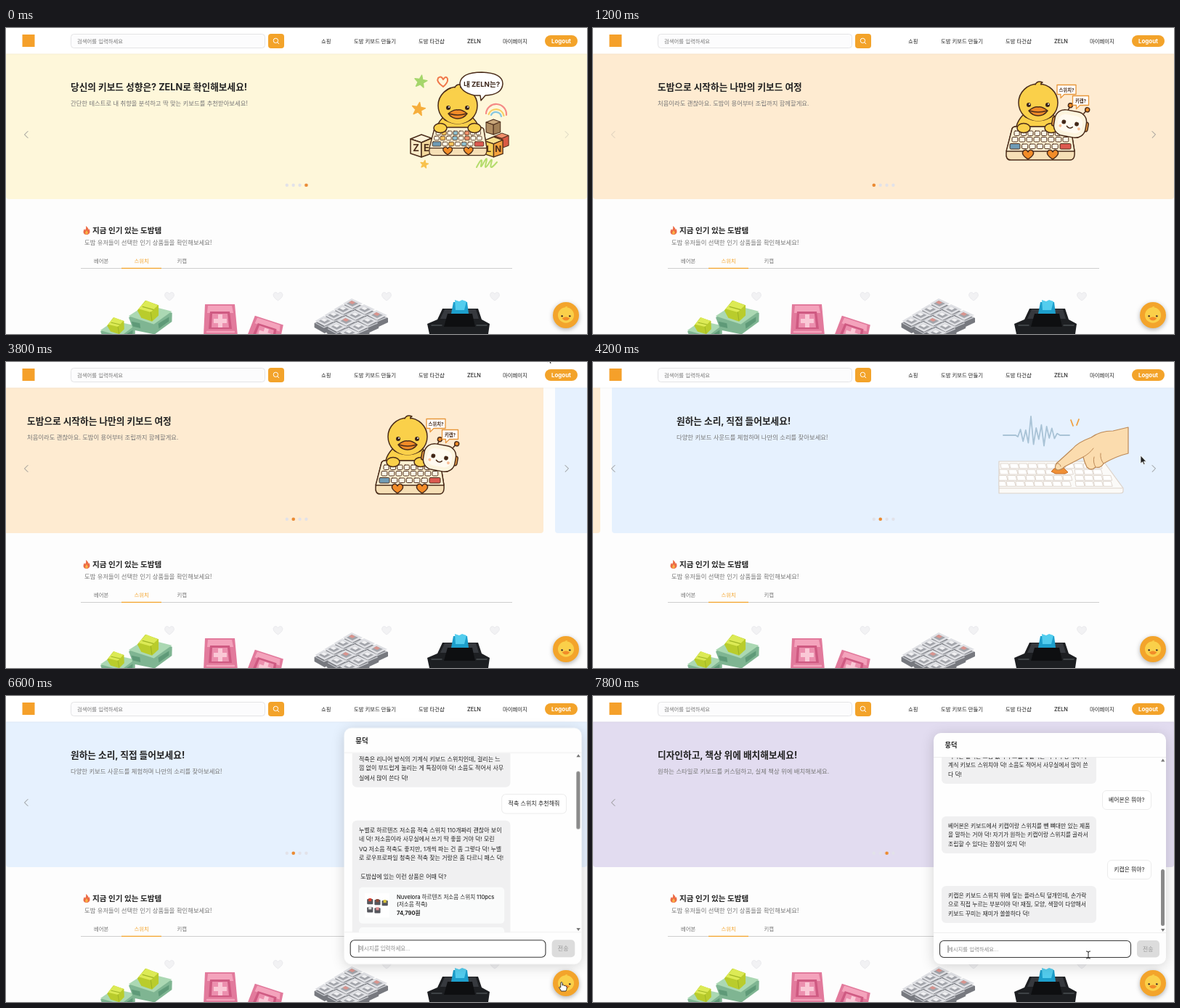
An HTML page for the animation above (8000 ms loop, 800 by 422 pixels).

```html
<!DOCTYPE html>
<html lang="ko">
<head>
<meta charset="utf-8">
<title>키보드 상점</title>
<style>
html, body { margin: 0; width: 100%; height: 100%; overflow: hidden; background: #fdfdfd; }
body { position: relative; font-family: Inter, "Noto Sans CJK KR", "Noto Sans CJK", sans-serif; color: #222; }
svg { position: absolute; left: 0; top: 0; display: block; overflow: hidden; fill: #222; }
.loop { animation: 8s step-end -10ms infinite; }
.title { font-size: 12.7px; font-weight: 700; }
.sub { font-size: 8.36px; fill: #777; }
.small { font-size: 7.37px; }
.medium { font-weight: 500; }
.bold { font-weight: 700; }
.gray { fill: #777; }
.ink { stroke: #4a2c1a; stroke-width: 1.5; stroke-linejoin: round; stroke-linecap: round; }
.line { fill: none; stroke-linecap: round; stroke-linejoin: round; }
.header { filter: drop-shadow(0 .5px 1px rgba(0,0,0,.08)); }

#track { animation-name: track; }
@keyframes track {
  0% { transform: translateX(-2448px); }
  5% { transform: translateX(-1720px); }
  7.5% { transform: translateX(-634px); }
  10% { transform: translateX(-40px); }
  12.5% { transform: none; }
  47.5% { transform: translateX(-60px); }
  50% { transform: translateX(-470px); }
  52.5% { transform: translateX(-790px); }
  55% { transform: translateX(-816px); }
  92.5% { transform: translateX(-1060px); }
  95% { transform: translateX(-1550px); }
  97.5%, 100% { transform: translateX(-1632px); }
}
#dot { animation-name: dot; }
@keyframes dot {
  0% { transform: translateX(26.6px); }
  5% { transform: none; }
  47.5% { transform: translateX(8.9px); }
  92.5%, 100% { transform: translateX(17.7px); }
}
#prev { animation-name: prev; }
@keyframes prev { 0%, 47.5%, 100% { opacity: 1; } 5% { opacity: .35; } }
#next { animation-name: next; }
@keyframes next { 0% { opacity: .35; } 5%, 100% { opacity: 1; } }

#chat {
  position: absolute; left: 469px; top: 51px; width: 320px; height: 319px; overflow: hidden;
  background: #fefefe; border-radius: 10px; box-shadow: 0 3px 18px rgba(0,0,0,.17);
  transform-origin: 50% 100%; animation-name: open;
}
@keyframes open {
  0% { visibility: hidden; }
  82.5% { visibility: visible; transform: scale(1.022); }
  85%, 100% { visibility: visible; transform: none; }
}
#view { position: absolute; top: 33px; width: 320px; height: 243px; overflow: hidden; border: solid #eee; border-width: 1px 0; box-sizing: border-box; }
#log { display: flex; flex-direction: column; gap: 9px; padding: 6px 20px 14px 11px; animation-name: scroll; }
@keyframes scroll {
  0%, 82.5% { transform: translateY(-47px); }
  85% { transform: translateY(-340px); }
  87.5%, 100% { transform: translateY(-471px); }
}
.bot, .me { box-sizing: border-box; flex: none; font-size: 7.83px; line-height: 12.6px; padding: 6.6px 9px; border-radius: 6px; white-space: pre; }
.bot { position: relative; width: 213px; height: 51px; background: #f0f0f1; }
.tall { height: 273px; }
.me { align-self: flex-end; height: 27px; padding: 6.2px 8.5px; border: 1px solid #ececec; background: #fff; }
.card { position: absolute; left: 9px; width: 196px; height: 49px; border-radius: 5px; background: #fafbfb; font-size: 7.4px; line-height: 10.9px; font-weight: 500; }
.card p { position: absolute; left: 51px; top: 8.5px; margin: 0; }
.card svg { left: 8px; top: 8px; background: #fff; }
#thumb { position: absolute; left: 313px; top: 44px; width: 5px; height: 78px; border-radius: 3px; background: #8a8a8a; animation-name: thumb; }
@keyframes thumb {
  0%, 82.5% { transform: translateY(14.5px); }
  85% { transform: translateY(104px); }
  87.5%, 100% { transform: translateY(144px); }
}

#tip { animation-name: tip; filter: drop-shadow(0 1px 3px rgba(0,0,0,.16)); }
@keyframes tip { 0%, 82.5%, 100% { visibility: hidden; } 62.5% { visibility: visible; } }
#button { animation-name: bounce; filter: drop-shadow(0 2px 3px rgba(0,0,0,.3)); }
@keyframes bounce {
  0%, 30%, 100% { transform: none; }
  25% { transform: translateY(-4px); }
  27.5% { transform: translateY(-7.5px); }
}

#cursor { animation-name: move; }
@keyframes move {
  0% { transform: translate(747px, -30px); }
  47.5% { transform: translate(745px, -10px); animation-timing-function: steps(6); }
  62.5% { transform: translate(772px, 407px); animation-timing-function: step-end; }
  65% { transform: translate(772px, 409px); }
  70% { transform: translate(769px, 404px); }
  75%, 82.5% { transform: translate(766px, 400px); animation-timing-function: steps(3); }
  90%, 100% { transform: translate(682px, 357px); }
}
#arrow { animation-name: arrow; }
@keyframes arrow { 0%, 62.5%, 100% { visibility: hidden; } 47.5% { visibility: visible; } }
#hand { animation-name: hand; }
@keyframes hand { 0%, 85%, 100% { visibility: hidden; } 62.5% { visibility: visible; } }
#beam { animation-name: beam; }
@keyframes beam { 0% { visibility: hidden; } 85%, 100% { visibility: visible; } }
</style>
</head>
<body>
<svg id="page" width="800" height="422"></svg>

<div id="chat" class="loop">
  <div id="view"><div id="log" class="loop">
    <div class="me">적축은 뭐야?</div>
    <div class="bot">적축은 리니어 방식의 기계식 키보드 스위치인데, 걸리는 느
낌 없이 부드럽게 눌리는 게 특징이야 덕! 소음도 적어서 사무
실에서 많이 쓴다 덕!</div>
    <div class="me">적축 스위치 추천해줘</div>
    <div class="bot tall">누벨로 하르텐즈 저소음 적축 스위치 110개짜리 괜찮아 보이
네 덕! 저소음이라 사무실에서 쓰기 딱 좋을 거야 덕! 모린
VQ 저소음 적축도 좋지만, 1개씩 파는 건 좀 그렇다 덕! 누벨
로 로우프로파일 청축은 적축 찾는 거랑은 좀 다르니 패스 덕!

 도밤샵에 있는 이런 상품은 어때 덕?</div>
    <div class="me">적축이 뭐야?</div>
    <div class="bot">적축은 걸리는 느낌 없이 부드럽게 눌리는 리니어 방식의 기
계식 키보드 스위치야 덕! 소음도 적어서 사무실에서 많이 쓴
다 덕!</div>
    <div class="me">베어본은 뭐야?</div>
    <div class="bot">베어본은 키보드에서 키캡이랑 스위치를 뺀 뼈대만 있는 제품
을 말하는 거야 덕! 자기가 원하는 키캡이랑 스위치를 골라서
조립할 수 있다는 장점이 있지 덕!</div>
    <div class="me">키캡은 뭐야?</div>
    <div class="bot">키캡은 키보드 스위치 위에 덮는 플라스틱 덮개인데, 손가락
으로 직접 누르는 부분이야 덕! 재질, 모양, 색깔이 다양해서
키보드 꾸미는 재미가 쏠쏠하다 덕!</div>
  </div></div>
  <div id="thumb" class="loop"></div>
  <svg width="320" height="319">
    <text class="bold" x="15.5" y="20.3" font-size="9.2">뭉덕</text>
    <path d="M313 39.5l2.7-4 2.7 4zM313 270l2.7 4 2.7-4z" fill="#777"/>
    <rect x="8.5" y="286.5" width="263" height="23" rx="5.5" fill="#fff" stroke="#3a3a3a" stroke-width="1.1"/>
    <path d="M20 293v10" stroke="#333" stroke-width=".7"/>
    <text class="small" x="20" y="300.8" fill="#8a8a8a">메시지를 입력하세요...</text>
    <rect x="280" y="286" width="31" height="23.5" rx="5" fill="#dcdcdc"/>
    <text class="medium" x="288" y="300.8" font-size="7.8" fill="#999">전송</text>
  </svg>
</div>

<svg id="overlay" width="800" height="422"></svg>

<script>
const text = (x, y, cls, str, extra = '') => `<text x="${x}" y="${y}" class="${cls}" ${extra}>${str}</text>`;
const poly = (fill, points, extra = '') => `<polygon points="${points}" fill="${fill}" ${extra}/>`;
const path = (d, fill, extra = '') => `<path d="${d}" fill="${fill}" ${extra}/>`;
const curve = (d, stroke, width = 1.5) => `<path class="line" d="${d}" stroke="${stroke}" stroke-width="${width}"/>`;
const times = (n, fn) => Array.from({ length: n }, (_, i) => fn(i)).join('');
const move = (x, y, body, extra = '') => `<g transform="translate(${x} ${y}) ${extra}">${body}</g>`;

const star = (x, y, r, fill) => {
  const points = times(10, i => {
    const a = i * Math.PI / 5 - 1.4, d = i % 2 ? r * .42 : r;
    return `${x + d * Math.cos(a)},${y + d * Math.sin(a)} `;
  });
  return poly(fill, points, `stroke="${fill}" stroke-width="1.5" stroke-linejoin="round"`);
};

const duckHead = `
  <ellipse rx="27" ry="26" fill="#fad04a"/>
  <path d="M-4 -25Q-1 -31 6 -28Q3 -27 4 -25" fill="#fad04a"/>
  <g stroke="none"><circle cx="-13" cy="3" r="3" fill="#38231a"/><circle cx="13" cy="3" r="3" fill="#38231a"/>
  <circle cx="-12" cy="2" r="1" fill="#fff"/><circle cx="14" cy="2" r="1" fill="#fff"/></g>
  <path d="M-13 11Q-5 5 0 6Q5 5 13 11Q8 18 0 18Q-8 18 -13 11Z" fill="#f28c28"/>
  <path d="M-12 11Q0 15 12 11" fill="none"/>`;
const duck = `<path d="M-20 16Q-36 32 -28 50H28Q36 32 20 16Z" fill="#fad04a"/>${duckHead}
  <path d="M-17 21Q0 30 17 21L18 30H-18Z" fill="#fad04a" stroke="none"/>`;
const wings = (left, right, y) => [left, right].map(x => `<ellipse cx="${x}" cy="${y}" rx="9" ry="6.5" fill="#fad04a"/>`).join('');

const keyRow = (x, y, n, pitch, fills) => times(n, i =>
  `<rect x="${x + i * pitch}" y="${y}" width="${pitch - 2.2}" height="6.5" rx="1.4" fill="${fills[i % fills.length]}"/>`);
const keyboard = fills => `
  ${path('M577 139Q578 136 582 136H653Q657 136 658 139L663 170Q664 182 657 182H575Q568 182 569 172Z', '#f6dfb6')}
  ${path('M577 139Q578 136 582 136H653Q657 136 658 139L663 170H569Z', '#fdf0d2')}
  <g stroke-width="1">${keyRow(580, 142, 8, 9.4, fills)}${keyRow(577, 150.5, 8, 10, fills)}
  <rect x="574" y="159.5" width="14" height="7.5" rx="1.4" fill="#6f9bb5"/>
  ${keyRow(590.5, 160, 5, 10.4, fills)}
  <rect x="643" y="159.5" width="15" height="7.5" rx="1.4" fill="#dc5a50"/></g>`;
const feet = [599, 633].map(x => path(`M${x} 181Q${x - 11} 174 ${x - 6} 169Q${x - 2} 167 ${x} 171Q${x + 2} 167 ${x + 6} 169Q${x + 11} 174 ${x} 181Z`, '#f28c28')).join('');

const robot = move(657, 132, `
  ${path('M-6 -18L-4 -24M16 -17L19 -22', 'none')}
  <circle cx="-4" cy="-25" r="3" fill="#f28c28"/><circle cx="20" cy="-23" r="3" fill="#f28c28"/>
  <rect x="-25" y="-6" width="6" height="13" rx="3" fill="#f3a44a"/><rect x="19" y="-6" width="6" height="13" rx="3" fill="#f3a44a"/>
  <rect x="-22" y="-18" width="44" height="36" rx="14" fill="#fdf4de"/>
  <rect x="-17" y="-12" width="34" height="24" rx="10" fill="#fffaf0" stroke="none"/>
  <circle cx="-9" cy="-1" r="2.2" fill="#38231a"/><circle cx="9" cy="-1" r="2.2" fill="#38231a"/>
  ${path('M-4 4Q0 8 4 4', 'none')}
  <g stroke="none" fill="#f8bd94"><circle cx="-13" cy="5" r="2"/><circle cx="13" cy="5" r="2"/></g>`, 'rotate(10)');
const balloon = (x, y, w, str) =>
  path(`M${x} ${y}h${w}v13h${-w + 10}l-5 5v-5h-5z`, '#fff', 'stroke="#e8963a" stroke-width="1.3" stroke-linejoin="round"')
  + text(x + w / 2, y + 9, 'bold', str, 'font-size="6.3" text-anchor="middle" fill="#4a2c1a"');

const journeyArt = `<g class="ink">${move(613, 103, duck)}${keyboard(['#fdf7e6'])}
  ${wings(593, 631, 138)}${feet}${robot}</g>${balloon(639, 78.5, 26, '스위치?')}${balloon(660.5, 93.5, 22, '키캡?')}`;

const block = (x, y, scale, top, left, right, a = '', b = '') => move(x, y, `
  ${poly(top, '0,6 15,0 29,5 15,11')}${poly(left, '0,6 15,11 15,31 0,26')}${poly(right, '15,11 29,5 29,26 15,31')}
  <g font-size="13" text-anchor="middle" fill="#4a2c1a" stroke="none">
  ${text(7.5, 23, 'bold', a)}${text(22, 23, 'bold', b)}</g>`, `scale(${scale})`);
const testArt = `
  ${star(571, 74, 9, '#a5d66b')}${star(568, 112, 9.5, '#f6ae3c')}${star(576, 188, 5.5, '#f8c24e')}
  ${curve('M602 81Q592 74 595 69Q599 65 602 71Q606 65 608 70Q609 75 602 81', '#f0784a', 2)}
  ${curve('M661 118A14 14 0 0 1 689 120', '#f58a86', 2.2)}${curve('M664.500 119A11 11 0 0 1 685.500 121', '#f9cf62', 2.2)}${curve('M668 120A7.500 7.500 0 0 1 682 122', '#86c7e0', 2.2)}
  ${curve('M648 192Q656 177 655 185Q652 196 657 187Q664 174 661 186Q658 197 664 188Q671 176 668 187Q665 198 676 185', '#b4dc6c', 2)}
  <g class="ink">${block(661, 126, .68, '#c9a77a', '#b08d62', '#a17f56')}
  ${move(622, 107, duck)}
  ${block(557, 147, 1, '#fdf3da', '#fbeac6', '#f3d79c', 'Z', 'E')}
  ${block(673, 145, .66, '#f28f6a', '#e8694e', '#d95a44')}
  ${block(658, 150, .9, '#fbe08e', '#f8cf58', '#f6a23e', 'L', 'N')}
  <g transform="translate(105 22.8) scale(.84)">${keyboard(['#fdf7e6', '#f9c25c', '#fdf7e6', '#8fbfce', '#fdf7e6', '#f0906a', '#fdf7e6'])}${feet}</g>
  ${wings(598, 645, 138)}
  ${path('M645 93Q625 88 625 76Q627 61 655 61Q684 62 684 77Q683 92 660 93L654 100L653 93Z', '#fff')}</g>
  ${text(655, 80.5, 'bold', '내 ZELN는?', 'font-size="9.600" text-anchor="middle" fill="#3a2418"')}`;

const wave = Array.from({ length: 16 }, (_, i) => {
  const swing = [3, 8, 12, 7, 15, 26, 18, 10][Math.min(i, 15 - i)] * (i < 8 ? 1 : .8);
  return `L${559 + i * 3.6} ${101 + (i % 2 ? -swing : swing * .7)}`;
}).join('');
const soundArt = `
  ${curve(`M539 101H556${wave}L617 101H630`, '#a9c3d6', 1.8)}
  ${curve('M632 80L635 88M643 79L640 87', '#f0a040', 1.8)}
  ${path('M533 137H677L704 174V178Q704 181 700 181H533Z', '#fbfaf8', 'stroke="#ddd3ca" stroke-width="1.2"')}
  ${curve('M533 174H703', '#ddd3ca', 1)}
  <g stroke="#ddd3ca" stroke-width=".9">${times(4, r => times(11 + (r > 1), i => {
    const x = 535 + i * 12.7 - r * 1.5 + (i > 7 ? r * 2 : 0), y = 140 + r * 8.2;
    return poly('#fff', `${Math.max(533, x)},${y} ${x + 11},${y} ${x + 13},${y + 6.8} ${Math.max(533, x + 1)},${y + 6.8}`);
  }))}</g>
  ${path('M609 147L622 146L628 152L624 154H611L605 151Z', '#f08f35', 'stroke="#c8702a" stroke-width="1"')}
  ${path('M711 90L690 95Q672 95 660 104Q641 111 634 120L612 140Q608 148 614 149Q619 149 624 144L649 131Q651 139 654 145Q660 151 666 145Q673 147 677 140Q694 130 711 126Z', '#fbdcae', 'stroke="#bd8a57" stroke-width="1.2" stroke-linejoin="round"')}
  ${curve('M649 131Q658 126 663 119M666 145Q662 138 664 131M677 140Q672 134 673 126M612 140Q617 139 618 144', '#bd8a57', 1)}`;

const deskArt = `
  <rect x="552" y="148" width="156" height="9" rx="3" fill="#c9a27c"/>
  <path d="M566 157v45M694 157v45" stroke="#b08a66" stroke-width="6"/>
  <rect x="594" y="82" width="74" height="47" rx="4" fill="#6d668c"/><rect x="598" y="86" width="66" height="39" rx="2" fill="#c9c0ea"/>
  <path d="M631 129v17M617 147h28" stroke="#6d668c" stroke-width="4"/>
  <rect x="591" y="140" width="80" height="9" rx="2" fill="#fff" stroke="#9d93bd"/>`;

const slides = [
  ['#feebd1', '도밤으로 시작하는 나만의 키보드 여정', '처음이라도 괜찮아요. 도밤이 용어부터 조립까지 함께할게요.', journeyArt],
  ['#e6f1fe', '원하는 소리, 직접 들어보세요!', '다양한 키보드 사운드를 체험하며 나만의 소리를 찾아보세요!', soundArt],
  ['#e2dcf0', '디자인하고, 책상 위에 배치해보세요!', '원하는 스타일로 키보드를 커스텀하고, 실제 책상 위에 배치해보세요.', deskArt],
  ['#fef7da', '당신의 키보드 성향은? ZELN로 확인해보세요!', '간단한 테스트로 내 취향을 분석하고 딱 맞는 키보드를 추천받아보세요!', testArt],
].map(([color, title, sub, art], i) => move(i * 816, 0, `
  <rect y="30" width="800" height="206" rx="4" fill="${color}"/>
  ${text(89, 86.4, 'title', title)}${text(89, 107.1, 'sub', sub)}${art}`)).join('');

const nav = [[434, '쇼핑'], [479, '도밤 키보드 만들기'], [568, '도밤 타건샵'], [635, 'ZELN'], [684, '마이페이지']]
  .map(([x, label]) => text(x, 20.6, 'small medium', label)).join('');

const heart = x => path(`M${x} 376Q${x - 9} 370 ${x - 5.5} 365.5Q${x - 2} 363 ${x} 367Q${x + 2} 363 ${x + 5.5} 365.5Q${x + 9} 370 ${x} 376Z`, '#f2f2f4', 'stroke="#e6e6ea" stroke-width=".8"');
const greenSwitch = `
  ${poly('#7fb592', '-30,-2 -4,-14 30,0 28,12 2,26 -26,16')}${poly('#abd8b3', '-30,-4 -4,-16 30,-2 3,12')}
  ${poly('#5f9a78', '-27,4 -16,8 -16,15 -26,11')}${poly('#5f9a78', '9,12 25,5 24,11 9,19')}
  ${poly('#b9cc2c', '-17,-10 -4,-22 13,-13 11,1 1,8 -13,1')}${poly('#dcea55', '-15,-12 -3,-22 12,-13 1,-5')}
  ${curve('M1 -5V6M-9 -14L5 -8', '#9fb526', 1.2)}`;
const pinkSwitch = `
  ${poly('#e27a9c', '-21,-22 20,-22 24,22 -23,22')}${poly('#f4a3bc', '-17,-20 16,-20 18,-10 -18,-10')}
  ${poly('#cf5a82', '-14,-12 13,-12 16,12 -16,12')}${poly('#ec8fae', '-11,-9 10,-9 12,10 -12,10')}
  ${path('M-3 -8h6v6h6v6h-6v6h-6v-6h-6v-6h6z', '#fac8d6')}${curve('M-18 16H19', '#f4a3bc', 2.5)}`;
const greySwitches = times(4, r => times(3, c => move(476 + c * 17 - r * 12.8, 373 + c * 8 + r * 8, `
  ${poly('#77797f', '0,4 16,11 16,17 1,24 -13,16 -13,10')}${poly('#dfe0e4', '0,0 15,7 1,14 -12,7')}
  ${poly('#a3a5ab', '0,3 9,7 1,11 -7,7')}${poly((r + c * 2) % 4 ? '#f0f0f2' : '#d9948e', '0,3 5,5.500 1,8 -4,5.500')}
  ${curve('M-11 10L0 16L14 10', '#c6c8cd', 1.4)}`)));
const blackSwitch = `
  ${poly('#1d1f22', '601,387 650,387 655,402 666,408 664,422 583,422 580,408 594,402')}
  ${poly('#36393e', '604,388 647,388 651,401 598,401')}${poly('#0e0f11', '608,394 642,394 646,412 603,412')}
  ${poly('#1d9fcc', '616,378 635,378 637,394 613,394')}${poly('#53cdee', '618,375 624,377 628,375 634,377 631,389 619,389')}
  ${curve('M586 410H600M648 410H662', '#4a4d52', 1.4)}`;
const products = `
  ${move(154, 416, greenSwitch, 'scale(.8) rotate(-10)')}${move(199, 397, greenSwitch, 'rotate(-8)')}
  ${move(295, 403, pinkSwitch)}${move(357, 421, pinkSwitch, 'rotate(18) scale(1 .85)')}
  ${greySwitches}${blackSwitch}`;

page.innerHTML = `
  <g id="track" class="loop">${slides}</g>
  <g class="line" stroke="#8d8d8d" stroke-width="1"><path id="prev" class="loop" d="M30 142.5l-4.5 4.5 4.5 4.5"/><path id="next" class="loop" d="M770 142.5l4.5 4.5-4.5 4.5"/></g>
  ${times(4, i => `<circle cx="${386.8 + i * 8.87}" cy="216.8" r="2.2" fill="#e2e2e9"/>`)}
  <circle id="dot" class="loop" cx="386.8" cy="216.8" r="2.3" fill="#ec8a30"/>
  <rect class="header" width="800" height="35.5" fill="#fff"/>
  <rect x="22.5" y="9" width="17" height="17" fill="#f5a02a"/>
  <rect x="89.5" y="8.5" width="267" height="19" rx="4" fill="#fcfcfd" stroke="#e4e4e6"/>
  ${text(98, 20.6, 'small gray', '검색어를 입력하세요')}
  <rect x="361" y="8" width="22" height="20" rx="4" fill="#f3a32a"/>
  <circle cx="371.4" cy="17.4" r="3.2" fill="none" stroke="#fff"/>${curve('M373.8 19.8L375.8 21.8', '#fff', 1)}
  ${nav}
  <rect x="742" y="10" width="45" height="16" rx="8" fill="#f3a32a"/>
  ${text(764.5, 20.8, 'bold', 'Logout', 'font-size="7.9" text-anchor="middle" fill="#fff"')}
  ${path('M110 273Q114 276 113.5 278.5L114.5 277Q116.500 281 114.500 283.500Q113 285 111 285Q107 285 106.500 281.500Q106.500 279 108 277L109 279Q111 276 110 273Z', '#ec6a45')}
  ${path('M111 279Q113.500 282 112.500 283.500Q111 285 109.500 284Q108.500 282 111 279Z', '#f9b545')}
  ${text(119, 283.4, 'bold', '지금 인기 있는 도밤템', 'font-size="10.6"')}
  ${text(108, 299.1, 'sub', '도밤 유저들이 선택한 인기 상품들을 확인해보세요!')}
  ${text(121, 324.3, 'small gray', '베어본')}${text(176.5, 324.3, 'small medium', '스위치', 'fill="#f3a32a"')}${text(235.5, 324.3, 'small gray', '키캡')}
  <path d="M103 331.5H697" stroke="#cfcfcf"/><path d="M159 331.3H214" stroke="#f3a32a" stroke-width="1.2"/>
  ${[225, 374.5, 524, 673].map(heart).join('')}${products}`;

overlay.innerHTML = `
  <g id="tip" class="loop">${path('M711 347H785Q789 347 789 351V363Q789 367 785 367H775L771.5 371L768 367H711Q707 367 707 363V351Q707 347 711 347Z', '#fff')}
  ${text(748, 359.8, 'small', '키보드 추천받아 보세요!', 'text-anchor="middle" font-weight="600" fill="#f0a02c"')}</g>
  <g id="button" class="loop"><circle cx="771" cy="396" r="18" fill="#f3a42b"/>
  ${move(771, 396, duckHead, 'scale(.41)')}</g>
  <g id="cursor" class="loop">
    <path id="arrow" class="loop" d="M0 0V11L2.6 8.7L4.4 12.5L6 11.7L4.3 8.2H7.7Z" fill="#222" stroke="#fff" stroke-width=".7"/>
    <path id="hand" class="loop" d="M-2 -5Q-.5 -6 .2 -4.5V-1Q2 -2 2.7 -.5Q4.3 -1.2 4.9 .3Q6.3 .2 6.3 1.8Q6.3 5 4.8 7H-1.5Q-3 4 -4.6 2Q-4.4 .6 -2.3 2Z" fill="#fff" stroke="#222" stroke-width=".9" stroke-linejoin="round"/>
    <path id="beam" class="loop line" d="M-2.5 -5Q0 -5 0 -3.5Q0 -5 2.5 -5M0 -4V4M-2.5 5Q0 5 0 3.5Q0 5 2.5 5" stroke="#222" stroke-width="1"/>
  </g>`;

const switches = times(5, i => `<rect x="${3 + i % 3 * 10}" y="${8 + (i > 2) * 11 + i % 3}" width="8" height="7" rx="1" fill="#55565c"/>
  <rect x="${5 + i % 3 * 10}" y="${7 + (i > 2) * 11 + i % 3}" width="4" height="4" fill="${['#d8402f', '#8b4a38', '#d9c43c', '#dcdcdc', '#e08e92'][i]}"/>`);
document.querySelector('.tall').insertAdjacentHTML('beforeend', [
  ['Nuvelora 하르텐즈 저소음 스위치 110pcs', '(저소음 적축)', '74,790원'],
  ['모린 VQ 저소음 적축 스위치', '(1개)', '890원'],
  ['Nuvelora 로우프로파일 스위치', '(청축)', '52,900원'],
].map(([name, kind, price], i) => `<div class="card" style="top:${90 + i * 54}px"><svg width="33" height="33">${switches}</svg><p>${name}\n${kind}\n<b>${price}</b></p></div>`).join(''));
</script>
</body>
</html>
```
